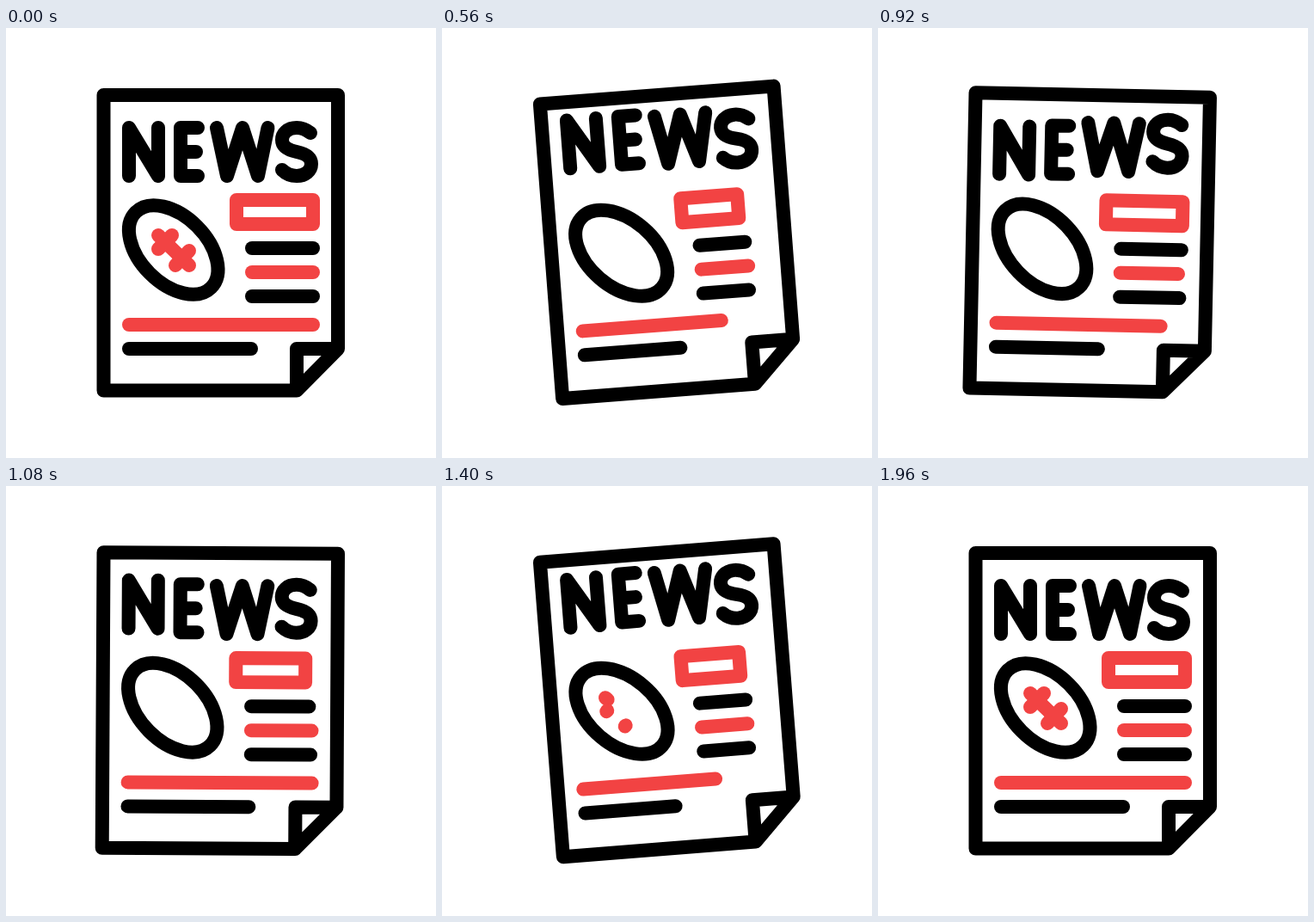
These frames come from a looping animation (500 by 500 pixels, 2 s). An HTML page with a canvas:

```html
<!DOCTYPE html>
<html lang="en">
<head>
<meta charset="utf-8">
<title>News</title>
<style>
html, body { margin: 0; width: 100%; height: 100%; overflow: hidden; background: #fff; }
canvas { display: block; width: 500px; height: 500px; }
</style>
</head>
<body>
<canvas id="stage" width="500" height="500"></canvas>
<script>
const ctx = document.getElementById('stage').getContext('2d');
const LOOP = 2000, STEP = 40;
const BLACK = '#000', RED = '#f24343';

const LETTERS = [
  'M143 172V116L177 172V116',
  'M223 116H203V172H223M203 144H221',
  'M245 116L257 172L275 116L293 172L304.5 116',
  'M354 122C349 118 344 116 338 116C327 116 321 123 321 130C321 139 329 142 338 144' +
  'C347 146 355 149 355 158C355 166 348 172 338 172C331 172 325 169 321 165'
].map(d => new Path2D(d));

const PAGE = new Path2D('M113.5 78H386V373L338 421.5H113.5ZM338 421.5V373H386');

// x from, x to, y, colour, delay, how much the right end retracts
const LINES = [
  [286, 357, 256, BLACK, 40, 18],
  [286, 357, 284, RED, 120, 18],
  [286, 357, 312, BLACK, 80, 18],
  [143, 357, 345, RED, 160, 66],
  [143, 285, 373, BLACK, 200, 46]
];

const LACES = [
  [177, 241, 213, 276],
  [177, 257, 193, 241],
  [197, 276, 213, 259]
];

const ease = p => 0.5 - 0.5 * Math.cos(Math.PI * Math.min(1, Math.max(0, p)));

// eased value through [time, value] keys
function track(t, keys) {
  if (t <= keys[0][0]) return keys[0][1];
  for (let i = 1; i < keys.length; i++) {
    const [t0, a] = keys[i - 1], [t1, b] = keys[i];
    if (t < t1) return a + (b - a) * ease((t - t0) / (t1 - t0));
  }
  return keys[keys.length - 1][1];
}

const tilt = t => track(t, [[120, 0], [520, -4.5], [960, 1.3], [1400, -4.5], [1840, 0]]);
const wave = t => track(t, [[120, 0], [520, 1], [920, 0], [1320, 1], [1720, 0]]);
const lace = t => track(t, [[0, 1], [240, 0], [1360, 0], [1600, 1]]);

function segment(x0, y0, x1, y1, color) {
  ctx.strokeStyle = color;
  ctx.beginPath();
  ctx.moveTo(x0, y0);
  ctx.lineTo(x1, y1);
  ctx.stroke();
}

function draw(t) {
  ctx.setTransform(1, 0, 0, 1, 0, 0);
  ctx.fillStyle = '#fff';
  ctx.fillRect(0, 0, 500, 500);
  ctx.lineWidth = 16;
  ctx.lineCap = ctx.lineJoin = 'round';

  // the page swings from the middle of its top edge
  ctx.translate(250, 78);
  ctx.rotate(tilt(t) * Math.PI / 180);
  ctx.translate(-250, -78);

  ctx.strokeStyle = BLACK;
  ctx.stroke(PAGE);

  LETTERS.forEach((path, i) => {
    ctx.save();
    ctx.translate(0, -17 * wave(t - 80 * i));
    ctx.stroke(path);
    ctx.restore();
  });

  ctx.beginPath();
  ctx.ellipse(194.7, 258, 62, 38.8, Math.PI / 4, 0, 2 * Math.PI);
  ctx.stroke();

  const k = lace(t);
  if (k > 0.005) {
    for (const [x0, y0, x1, y1] of LACES) {
      segment(x0, y0, x0 + (x1 - x0) * k, y0 + (y1 - y0) * k, RED);
    }
  }

  ctx.strokeStyle = RED;
  ctx.strokeRect(268, 200, 89 - 23.5 * wave(t), 28);

  for (const [x0, x1, y, color, delay, cut] of LINES) {
    segment(x0, y, x1 - cut * wave(t - delay), y, color);
  }
}

const start = performance.now();
function tick() {
  const t = (performance.now() - start) % LOOP;
  draw(Math.floor(t / STEP) * STEP);
  requestAnimationFrame(tick);
}
tick();
</script>
</body>
</html>
```
